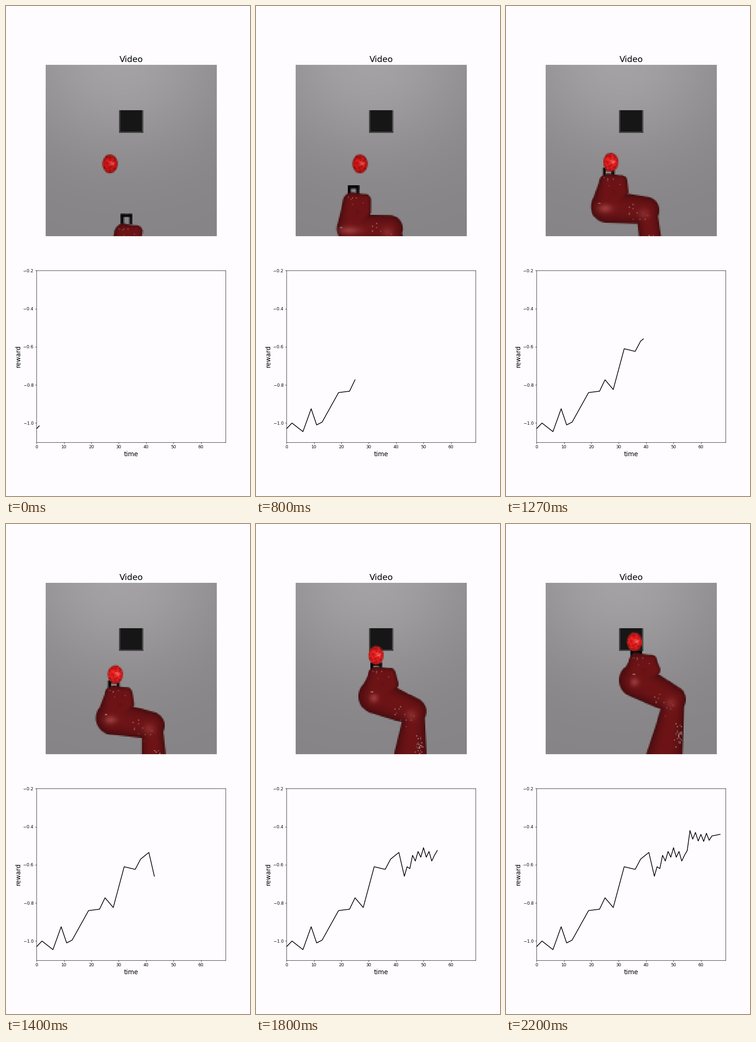
These frames come from a looping animation (529 by 1058 pixels, 2.27 s). A matplotlib script:

```python
import numpy as np
import matplotlib.pyplot as plt
from matplotlib.animation import FuncAnimation

LOOP_MS, TICK_MS = 2270, 10
STEPS, STEP_MS = 34, 200 / 3  # the picture changes 15 times a second
N = 128                       # camera resolution
CELL = 370.3 / N              # stage pixels per camera pixel
LEFT, TOP = 86.0, 127.0
PAPER = "#fefcff"

rows, cols = np.mgrid[0:N, 0:N]
X = LEFT + (cols + 0.5) * CELL
Y = TOP + (rows + 0.5) * CELL

rng = np.random.default_rng(4)
BALL_GRAIN = rng.uniform(0.78, 1.14, (N, N))
HAND_SPECKS = rng.normal((2, -6), (13, 6), (7, 2))
ARM_SPECKS = rng.normal((-21, 9), (9, 11), (11, 2))
BASE_SPECKS = rng.normal((14, 76), (4, 11), (30, 2))


def make_reward():
    """Rising trend through its main turns, with a late zigzag."""
    turns = np.array([
        (0, -1.03), (2, -1.0), (6, -1.045), (9, -.925), (11, -1.01), (13, -.995),
        (19, -.84), (23, -.833), (25, -.773), (28, -.824), (32, -.61), (36, -.624),
        (38, -.57), (41, -.535), (43, -.66), (46, -.57), (50, -.53), (54, -.57),
        (56, -.44), (60, -.46), (67, -.44)])
    x = np.arange(2 * STEPS)
    zigzag = 0.02 * (-1.0) ** x * ((x > 43) & (x < 64))
    return np.interp(x, *turns.T) + zigzag


def blend(k, start, end):
    a, b = np.array(start, float), np.array(end, float)
    return a + (b - a) * k / (STEPS - 1)


def pose(k):
    """Joint positions: the hand leads, the other joints follow from it."""
    keys = [0, 12, 19, 24, 29, 33]
    hand = np.array([np.interp(k, keys, [255, 209, 222, 252, 270, 286]),
                     np.interp(k, keys, [491, 424, 383, 352, 314, 300])])
    elbow = hand + blend(k, (-3.5, 68), (-3.5, 38))
    angle = np.radians(np.interp(k, [17, 24, 33], [0, 19, 28]))
    bend = elbow + blend(k, 80, 88) * np.array([np.cos(angle), np.sin(angle)])
    held = hand + blend(k, (22, -45), (-8, -45))
    rest = np.array([225, 341.5])
    return {
        "hand": hand, "elbow": elbow, "bend": bend,
        "knob": hand + (27, -4),
        "wrist": hand + blend(k, (22, 22), (35, 16)),
        "base": np.array([325, 603]),
        "grip": hand + blend(k, (6, -42), (-4, -27)),
        "ball": held if held[1] < rest[1] else rest,
    }


def paint(img, dist, color):
    a = np.clip(0.5 - dist / CELL, 0, 1)[..., None]
    img += a * (np.asarray(color, float) - img)


def box(x0, y0, x1, y1):
    return np.maximum(np.abs(X - (x0 + x1) / 2) - (x1 - x0) / 2,
                      np.abs(Y - (y0 + y1) / 2) - (y1 - y0) / 2)


def capsule(a, b, ra, rb):
    """Signed distance to a tapered limb and its roundness."""
    ab = b - a
    t = np.clip(((X - a[0]) * ab[0] + (Y - a[1]) * ab[1]) / (ab @ ab), 0, 1)
    r = ra + (rb - ra) * t
    d = np.hypot(X - a[0] - t * ab[0], Y - a[1] - t * ab[1])
    return d - r, 1 - np.clip(d / r, 0, 1) ** 2


def glow(center, sx, sy):
    return np.exp(-((X - center[0]) / sx) ** 2 - ((Y - center[1]) / sy) ** 2)


def make_room():
    light = np.exp(-((cols - 56) / 78) ** 2 - ((rows + 4) / 70) ** 2)
    img = (132 + 30 * light)[..., None] + np.array([2.0, 0.0, 2.0])
    img[34:51, 55:73] = 64
    img[34:50, 72] = 82
    img[34:50, 56:72] = 22
    return img


def draw_grip(img, p):
    x, y = p["grip"]
    for part in (box(x - 11.5, y, x + 11.5, y + 7),
                 box(x - 12.5, y + 1, x - 6, y + 22),
                 box(x + 6, y + 1, x + 12.5, y + 22)):
        paint(img, part, (7, 7, 8))


def draw_specks(img, mask, anchor, offsets, strength):
    for n, (dx, dy) in enumerate(offsets):
        i = int((anchor[0] + dx - LEFT) // CELL)
        j = int((anchor[1] + dy - TOP) // CELL)
        if 0 <= i < N and 0 <= j < N and mask[j, i]:
            a = strength * (0.5 + 0.25 * (n % 3))
            img[j, i] += a * (np.array([165, 148, 148]) - img[j, i])


def draw_arm(img, k, p):
    r_hand, r_knob, r_bend = 21, 13.5, 29.5
    r_elbow = np.interp(k, [12, 24], [31, 37.5])
    r_base = np.interp(k, [19, 28], [26, 53])
    limbs = [capsule(p["bend"] + (3, 8), p["base"], 23, r_base),
             capsule(p["bend"], p["elbow"], r_bend, r_elbow),
             capsule(p["elbow"], p["hand"], r_elbow, r_hand),
             capsule(p["hand"], p["knob"], r_hand, r_knob),
             capsule(p["knob"], p["wrist"], r_knob, r_knob),
             capsule(p["hand"], p["wrist"], r_hand, r_knob),
             capsule(p["wrist"], p["elbow"], r_knob, r_elbow)]
    dist = np.min([d for d, _ in limbs], axis=0)
    lit = np.max([q for _, q in limbs], axis=0)[..., None] ** 0.7
    color = np.array([64, 11, 13]) + lit * np.array([46, 9, 10])
    shine = (glow(p["elbow"] + (-4, 4), np.interp(k, [12, 24], [24, 9]), 9)
             + 0.6 * glow(p["bend"] + (-4, 8), 12, 11))
    paint(img, dist, color + shine[..., None] * np.array([44, 38, 36]))

    mask = dist < -3
    spot = blend(k, (-33, 4), (-6, -14))
    draw_specks(img, mask, p["elbow"], [spot, spot + (CELL, 0)], 1)
    draw_specks(img, mask, p["hand"], HAND_SPECKS, 0.4)
    draw_specks(img, mask, p["bend"], ARM_SPECKS, 0.5)
    draw_specks(img, mask, p["bend"], BASE_SPECKS, 0.6)


def draw_ball(img, p):
    x, y = p["ball"]
    q = np.hypot((X - x) / 16.5, (Y - y) / 20)
    grain = np.roll(BALL_GRAIN, (round(y / CELL), round(x / CELL)), (0, 1))
    lift = np.clip((341.5 - y) / 4, 0, 1)
    red = (np.interp(q, [0, 0.6, 1], [216, 200, 150]) + 24 * lift) * grain
    dim = (20 + 8 * lift) * grain
    shine = 80 * glow((x + 4, y - 1), 5, 4) * grain
    color = np.stack([red + 0.3 * shine, dim + shine, dim + shine], axis=-1)
    paint(img, (q - 1) * 18, np.clip(color, 0, 255))


def render(k):
    p = pose(k)
    img = make_room()
    draw_grip(img, p)
    draw_arm(img, k, p)
    draw_ball(img, p)
    return np.clip(img, 0, 255).astype(np.uint8)


reward = make_reward()
video = [render(k) for k in range(STEPS)]

fig, (cam, plot) = plt.subplots(2, 1, figsize=(8, 16), dpi=529 / 8, facecolor=PAPER)
fig.subplots_adjust(left=0.125, right=0.9, bottom=0.11, top=0.88, hspace=0.2)

cam.set_title("Video", fontsize=20)
cam.axis("off")
view = cam.imshow(video[0], interpolation="nearest")

plot.set_facecolor(PAPER)
plot.set(xlim=(0, 69), ylim=(-1.1, -0.2), yticks=np.linspace(-1, -0.2, 5))
plot.set_xlabel("time", fontsize=15)
plot.set_ylabel("reward", fontsize=15)
curve, = plot.plot([], [], color="black", lw=1.7)


def update(tick):
    # Step times are rounded to whole ticks
    k = min(int((tick * TICK_MS + 4) / STEP_MS), STEPS - 1)
    view.set_data(video[k])
    shown = 2 * k + 2
    curve.set_data(np.arange(shown), reward[:shown])
    return view, curve


anim = FuncAnimation(fig, update, frames=LOOP_MS // TICK_MS, interval=TICK_MS,
                     repeat=True, repeat_delay=0, blit=False)
plt.show()
```
